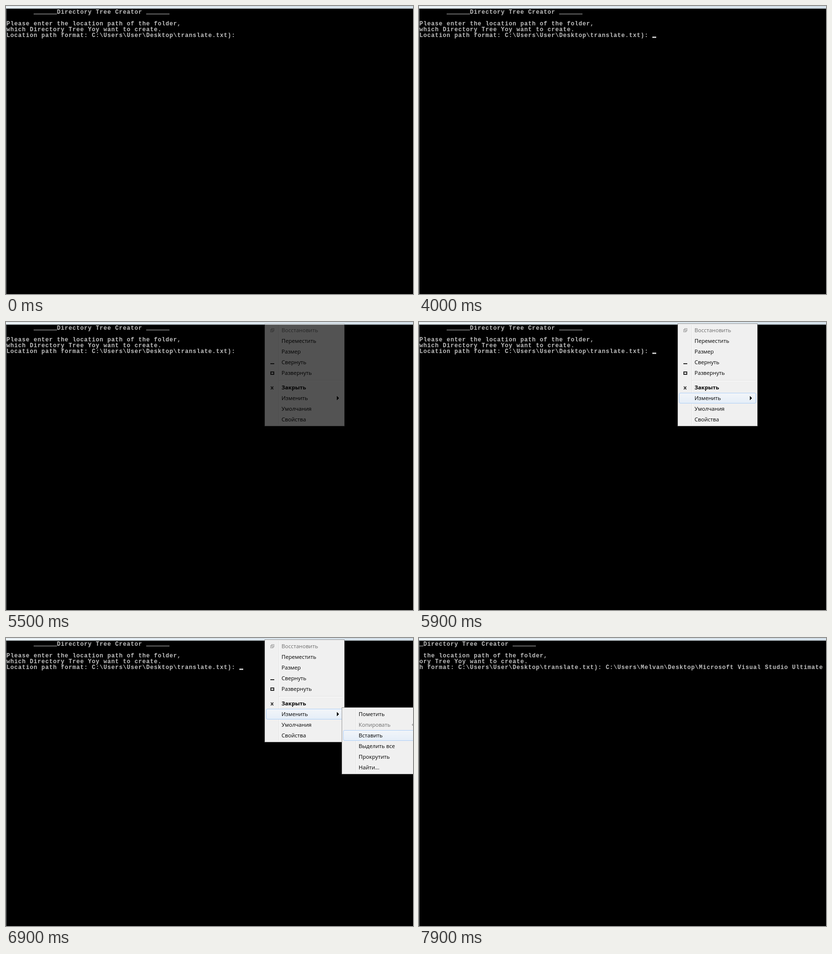
An HTML page that plays this animation: 839x594 px, repeating every 8 s.

```html
<!DOCTYPE html>
<html lang="ru">
<head>
<meta charset="utf-8">
<title>Directory Tree Creator</title>
<style>
  html, body { margin: 0; width: 100%; height: 100%; overflow: hidden; background: #000; }
  svg { display: block; width: 100%; height: 100%; }
  .console { font: bold 12px "Liberation Mono", monospace; fill: #c0c0c0; }
  .menu { font: 11.2px "Open Sans", "Noto Sans", sans-serif; fill: #000; }
  .menu .off { fill: #6d6d6d; }
  .menu .strong { font-weight: bold; }
  rect, path { shape-rendering: crispEdges; }
  .hover { shape-rendering: auto; }
</style>
</head>
<body>
<svg id="stage" viewBox="0 0 839 594" preserveAspectRatio="none">
  <defs>
    <linearGradient id="frame">
      <stop offset="0" stop-color="#e8eff3"/><stop offset="1" stop-color="#d3dfe8"/>
    </linearGradient>
    <linearGradient id="glow" x2="0" y2="1">
      <stop offset="0" stop-color="#f2f5f9"/><stop offset="1" stop-color="#e5eef8"/>
    </linearGradient>
  </defs>
  <rect width="839" height="594"/>
  <rect width="839" height="5" fill="url(#frame)"/>
  <rect y="5" width="839" height="1" fill="#606769"/>
  <rect y="6" width="1" height="588" fill="#6c7072"/>
</svg>
<script>
const LOOP = 8000, CELL = 8, LINE = 12, LEFT = 1, TOP = 6;
const PASTE = 7000, SCROLL = 12;
const stage = document.getElementById("stage");

function add(parent, tag, attrs, text) {
  const node = document.createElementNS("http://www.w3.org/2000/svg", tag);
  for (const key in attrs) node.setAttribute(key, attrs[key]);
  if (text) node.textContent = text;
  return parent.appendChild(node);
}
const box = (parent, x, y, width, height, fill) =>
  add(parent, "rect", { x, y, width, height, fill });
const show = (node, opacity) => {
  node.setAttribute("opacity", opacity);
  node.setAttribute("visibility", opacity > 0 ? "visible" : "hidden");
};

// Console: every character sits in its own cell.
const prompt = String.raw`Location path format: C:\Users\User\Desktop\translate.txt): `;
const pasted = String.raw`C:\Users\Melvan\Desktop\Microsoft Visual Studio Ultimate`;
const lines = [
  "       ______Directory Tree Creator ______",
  "",
  "Please enter the location path of the folder,",
  "which Directory Tree Yoy want to create.",
  prompt
];

function drawConsole(rows) {
  const group = add(stage, "g", { class: "console" });
  rows.forEach((row, r) => {
    const y = TOP + r * LINE, xs = [];
    let glyphs = "";
    [...row].forEach((char, c) => {
      const x = LEFT + c * CELL;
      if (char === "_") box(group, x, y + 10, CELL, 1, "#c0c0c0");
      else if (char !== " ") { glyphs += char; xs.push(x); }
    });
    if (glyphs) add(group, "text", { x: xs.join(" "), y: y + 10 }, glyphs);
  });
  return group;
}
const before = drawConsole(lines);
const after = drawConsole([...lines.slice(0, 4), prompt + pasted].map(s => s.slice(SCROLL)));
const cursor = box(stage, 0, 63, CELL, 3, "#c0c0c0");

// Menus
function drawPanel(x, y, width, height, gutter) {
  const group = add(stage, "g", { class: "menu" });
  box(group, x, y, width, height, "#979797");
  box(group, x + 1, y + 1, width - 2, height - 2, "#f5f5f5");
  box(group, x + 2, y + 2, width - 4, height - 4, "#f0f0f0");
  box(group, gutter, y + 3, 1, height - 6, "#e2e3e3");
  box(group, gutter + 1, y + 3, 1, height - 6, "#fff");
  return group;
}
const drawHover = (parent, x, y, width) => add(parent, "rect", {
  class: "hover", x: x + .5, y: y + .5, width: width - 1, height: 21,
  rx: 2.5, fill: "url(#glow)", stroke: "#aecff7"
});
const label = (parent, x, middle, text, style = "") =>
  add(parent, "text", { x, y: middle + 4, class: style }, text);

const main = drawPanel(533, 3, 165, 212, 562);
box(main, 563, 120, 131, 1, "#e0e0e0");
box(main, 563, 121, 131, 1, "#fff");
const mainHover = drawHover(main, 536, 146, 159);
["Восстановить", "Переместить", "Размер", "Свернуть", "Развернуть",
 "Закрыть", "Изменить", "Умолчания", "Свойства"].forEach((text, i) =>
  label(main, 568, 17 + i * 22 + (i > 4 ? 8 : 0), text, i === 0 ? "off" : i === 5 ? "strong" : ""));
add(main, "path", { d: "M547.5 13.5h5v5h-5zM545.5 15.5h5v5h-5z", fill: "none", stroke: "#a0a0a0" });
box(main, 545, 85, 8, 2, "#303030");
add(main, "path", { d: "M546 103h6v5h-6z", fill: "none", stroke: "#303030", "stroke-width": 2 });
add(main, "path", { d: "M546 133l5 6M551 133l-5 6", stroke: "#303030", "stroke-width": 1.8,
  style: "shape-rendering:auto" });
add(main, "path", { d: "M682 153v8l4-4z" });

const sub = drawPanel(692, 143, 160, 138, 721);
const subHover = drawHover(sub, 695, 190, 154);
["Пометить", "Копировать", "Вставить", "Выделить все", "Прокрутить", "Найти..."].forEach((text, i) =>
  label(sub, 727, 157 + i * 22, text, i === 1 ? "off" : ""));
add(sub, "path", { d: "M840 176l-3 3l3 3", fill: "none", stroke: "#6d6d6d" });

// The chosen item lingers briefly after the menus close.
const chosen = add(stage, "g", { class: "menu" });
drawHover(chosen, 695, 190, 154);
label(chosen, 727, 201, "Вставить");

const blinks = [1100, 1600, 2100, 2500, 3000, 3500, 4000, 4500, 5000,
                5500, 5900, 6400, 6900, 7000, 7400, 7900];
const fadeIn = (t, start) =>
  t < start || t >= PASTE ? 0 : Math.min(1, .345 * (Math.floor((t - start) / 100) + 1));

function render(t) {
  const done = t >= PASTE;
  show(before, done ? 0 : 1);
  show(after, done ? 1 : 0);
  cursor.setAttribute("x", done ? 833 : 481);
  show(cursor, blinks.filter(b => b <= t).length % 2);

  show(main, fadeIn(t, 5500));
  mainHover.setAttribute("y", t < 5900 ? 124.5 : 146.5);
  show(mainHover, t >= 5800 && !done ? 1 : 0);
  show(sub, fadeIn(t, 6300));
  show(subHover, t >= 6600 && !done ? 1 : 0);
  show(chosen, done ? Math.max(0, .8 - .24 * Math.floor((t - PASTE) / 100)) : 0);
}

const start = performance.now();
function tick() {
  render((performance.now() - start) % LOOP);
  requestAnimationFrame(tick);
}
tick();
</script>
</body>
</html>
```
